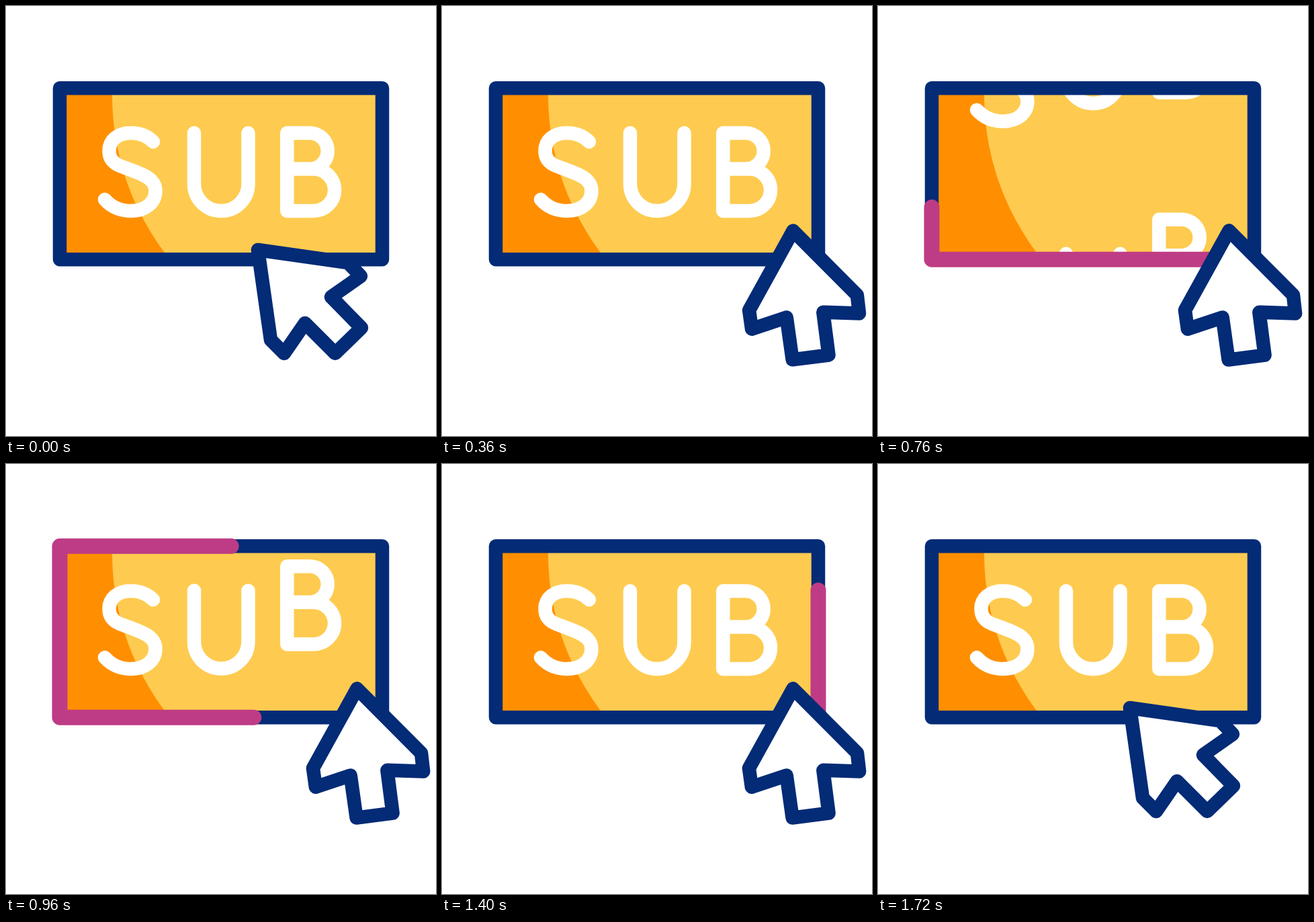
An HTML page for the animation above (2 s loop, 640 by 640 pixels).

```html
<!DOCTYPE html>
<html lang="en">
<head>
<meta charset="utf-8">
<title>Button click</title>
<style>
  html, body { margin: 0; width: 100%; height: 100%; overflow: hidden; background: #fff; }
  svg { display: block; width: 100%; height: 100%; }
</style>
</head>
<body>
<svg viewBox="0 0 640 640" fill="none" stroke-linecap="round" stroke-linejoin="round" stroke-width="20.5">
  <defs>
    <clipPath id="panel"><rect x="80" y="122.3" width="480" height="254.9"/></clipPath>
    <path id="S" d="M219 202C210 193 199 189 186 189C166 189 153.5 200 153.5 215.5C153.5 229 162 235 171 238.5C180 242 195 247 205 252C217 258 222.5 265 222.5 275C222.5 293 207 305 186 305C169 305 156 298 147 288"/>
    <path id="U" d="M280 189V264.7A40.25 40.25 0 0 0 360.5 264.7V189"/>
    <path id="B" d="M418.3 189H452A26.75 26.75 0 0 1 452 242.5H418.3ZM418.3 242.5H457.8A31.25 31.25 0 0 1 457.8 305H418.3Z"/>
  </defs>
  <g clip-path="url(#panel)">
    <rect x="80" y="122" width="480" height="256" fill="#ff8f00"/>
    <circle cx="548" cy="133" r="390" fill="#fecb50"/>
    <g id="letters" stroke="#fff"></g>
  </g>
  <rect x="80" y="122.3" width="480" height="254.9" stroke="#032b76"/>
  <path id="trail" d="M560 377.2H80V122.3H560Z" stroke="#be3c85" stroke-width="23"/>
  <path id="cursor" d="M375 363L509 382L528 402L484 433L529 479L490 517L445 472L414 517L394 497Z" fill="#fff" stroke="#032b76"/>
</svg>
<script>
const LOOP = 2000;
const TRAIL = 2 * (480 + 254.9);
const PIVOT = { x: 445, y: 430 };
const $ = id => document.getElementById(id);

// Eased progress from 0 to 1 between two times
function ease(t, start, end) {
  const s = Math.min(1, Math.max(0, (t - start) / (end - start)));
  return s * s * (3 - 2 * s);
}

function addLetter(id) {
  const use = document.createElementNS("http://www.w3.org/2000/svg", "use");
  use.setAttribute("href", "#" + id);
  $("letters").appendChild(use);
  return use;
}

// Each letter drops out below while a copy drops in from above
const letters = [
  { id: "S", out: 307, in: 217 },
  { id: "U", out: 384, in: 292 },
  { id: "B", out: 501, in: 391 }
].map(l => ({ ...l, leaving: addLetter(l.id), entering: addLetter(l.id) }));

const shiftY = (el, y) => el.setAttribute("transform", `translate(0 ${y.toFixed(2)})`);

function draw(t) {
  for (const l of letters) {
    shiftY(l.leaving, 220 * ease(t, 482, 482 + l.out));
    shiftY(l.entering, -200 * (1 - ease(t, 677, 677 + l.in)));
  }

  const head = TRAIL * ease(t, 340, 1345);
  const tail = TRAIL * ease(t, 780, 1581);
  const trail = $("trail");
  trail.style.display = head - tail > 0.1 ? "" : "none";
  trail.setAttribute("stroke-dasharray", `${head - tail} ${2 * TRAIL}`);
  trail.setAttribute("stroke-dashoffset", -tail);

  const go = ease(t, 130, 350) - ease(t, 1480, 1720);
  const scale = 1 - 0.1 * (ease(t, 350, 480) - ease(t, 480, 640));
  $("cursor").setAttribute("transform",
    `translate(${PIVOT.x + 93 * go} ${PIVOT.y}) rotate(${37 * go}) scale(${scale}) translate(${-PIVOT.x} ${-PIVOT.y})`);
}

const begin = performance.now();
function tick() {
  draw((performance.now() - begin) % LOOP);
  requestAnimationFrame(tick);
}
draw(0);
requestAnimationFrame(tick);
</script>
</body>
</html>
```
